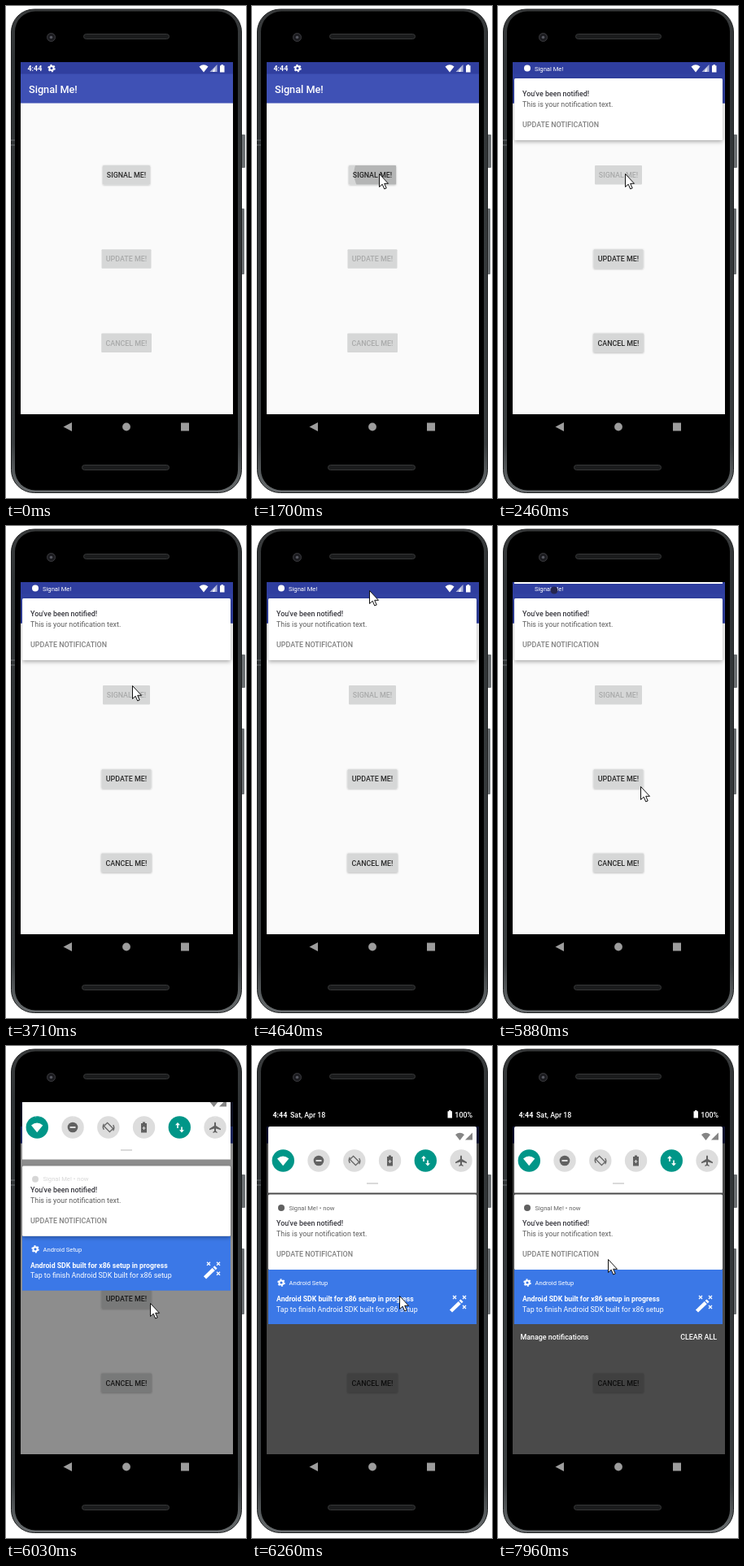
An HTML page that plays this animation: 295x605 px, repeating every 8000 ms.

```html
<!DOCTYPE html>
<html lang="en">
<head>
<meta charset="utf-8">
<title>Notification demo</title>
<style>
html, body { margin: 0; width: 100%; height: 100%; overflow: hidden; background: #fff; }
svg { display: block; width: 295px; height: 605px; }
text { font-family: Roboto, sans-serif; font-size: 8.89px; }
.medium { font-weight: 500; }
.bold { font-weight: 700; }
.small { font-size: 7.62px; }
.middle { text-anchor: middle; }
.end { text-anchor: end; }
.white { fill: #fff; color: #fff; }
.line { fill: none; stroke: currentColor; }
</style>
</head>
<body>
<svg viewBox="0 0 295 605">
  <defs>
    <linearGradient id="rim" x2="0" y2="1">
      <stop offset="0" stop-color="#3a3c3d"/><stop offset=".1" stop-color="#303436"/>
      <stop offset=".9" stop-color="#3a3e40"/><stop offset="1" stop-color="#6a6e70"/>
    </linearGradient>
    <clipPath id="screen"><path d="M18 69H279V502H18Z"/></clipPath>
    <clipPath id="notifyClip"><path d="M119 196H177V219.500H119Z"/></clipPath>
    <filter id="shadow" x="-10%" y="-20%" width="120%" height="150%">
      <feDropShadow dx="0" dy="2" stdDeviation="2.800" flood-opacity=".32"/>
    </filter>
    <filter id="lift" x="-10%" y="-20%" width="120%" height="150%">
      <feDropShadow dx="0" dy=".6" stdDeviation=".8" flood-opacity=".3"/>
    </filter>
    <path id="wifi" d="M0 2.600Q5.500-2 11 2.600L5.500 9.500Z"/>
    <path id="signal" d="M0 9H9V0Z"/>
    <path id="battery" d="M0 1.200H1.500V0H4V1.200H5.500V9.500H0Z"/>
    <g id="gear" class="line">
      <circle r="2.600" stroke-width="2"/><circle r="4" stroke-width="1.500" stroke-dasharray="2.090"/>
    </g>
  </defs>

  <!-- phone -->
  <path fill="#6b6f72" d="M289 158h4q1 0 1 1v39q0 1-1 1h-4zM289 249h3q1 0 1 1v79q0 1-1 1h-4z"/>
  <rect x="6.500" y="4" width="283" height="594.500" rx="28" fill="url(#rim)" stroke="#1b1d1e"/>
  <rect x="11" y="6.500" width="274" height="589" rx="25"/>
  <path stroke="#6a6f72" d="M6 165h5M6 171h5"/>
  <rect x="95.500" y="34.500" width="105" height="6" rx="3" fill="#1b1c1d" stroke="#363738"/>
  <rect x="93.500" y="564.500" width="107" height="6" rx="3" fill="#1b1c1d" stroke="#363738"/>
  <circle cx="55.500" cy="38.500" r="5" fill="#1c1c20" stroke="#3a3a3e"/>
  <circle cx="55.500" cy="38.500" r="1.800" fill="#55565f"/>
  <path fill="#9d9d9d" d="M70.500 517.500L81 512v11zM215 512.500h10v10h-10z"/>
  <circle cx="148" cy="517.500" r="4.900" fill="#9d9d9d"/>

  <g clip-path="url(#screen)">
    <path fill="#fafafa" d="M18 69H279V502H18Z"/>
    <path fill="#3f51b5" d="M18 83H279V119.500H18Z"/>
    <path fill="#303f9f" d="M18 69H279V83.500H18Z"/>
    <text class="white medium" x="28" y="107" style="font-size:12.700px">Signal Me!</text>

    <g id="buttons" class="medium middle"></g>
    <circle id="ripple" cx="156" cy="206" clip-path="url(#notifyClip)"/>

    <path id="barTint" fill="#303f9f" d="M18 69H279V119.500H18Z"/>
    <g id="clock" class="white">
      <text class="bold" x="26.500" y="80">4:44</text>
      <use href="#gear" x="56" y="76.500"/>
    </g>
    <text id="ticker" class="white small" x="45" y="79.500">Signal Me!</text>
    <circle id="tickerIcon" class="white" cx="36" cy="76.500" r="4"/>
    <g id="statusIcons" class="white">
      <use href="#wifi" x="237.500" y="72"/><use href="#signal" x="250.500" y="72" opacity=".6"/>
      <path d="M254 81h2.500v-5.500z"/><use href="#battery" x="263" y="72"/>
    </g>

    <path id="scrim" d="M18 69H279V502H18Z"/>
    <path id="topBlack" d="M18 69H279V99H18Z"/>
    <circle id="dot" cx="69" cy="79" r="4.500" fill="#26264f"/>

    <g id="setup" class="white">
      <path fill="#3b78e7" d="M20 275H276V342H20Z"/>
      <use href="#gear" x="36" y="291"/>
      <text class="small" x="45.500" y="293.700">Android Setup</text>
      <text class="bold" x="30" y="314" style="font-size:8.700px">Android SDK built for x86 setup in progress</text>
      <text x="30" y="326.500">Tap to finish Android SDK built for x86 setup</text>
      <path class="line" stroke-width="4.500" d="M244.500 326L258 313"/>
      <path stroke="#3b78e7" stroke-width="1.200" d="M253.500 313l4 4"/>
      <path class="line" stroke-width="1.300" d="M247 307l4 4m0-4l-4 4M259 307l4 4m0-4l-4 4M259 319l4 4m0-4l-4 4"/>
    </g>

    <g id="notice">
      <rect id="card" x="20" width="256" rx="1.500" fill="#fff" filter="url(#shadow)"/>
      <g id="noticeHead" fill="#616161">
        <circle cx="36" cy="199" r="4"/>
        <text class="small" x="45.500" y="201.700">Signal Me! • now</text>
      </g>
      <g id="noticeBody">
        <text class="medium" x="30" y="111" fill="#35353c">You've been notified!</text>
        <text x="30" y="124" fill="#5c5c5c">This is your notification text.</text>
        <text class="medium" x="30" y="149" fill="#808080">UPDATE NOTIFICATION</text>
      </g>
    </g>

    <g id="quick">
      <path fill="#fff" d="M20 101q0-2 2-2H274q2 0 2 2V180.500H20Z"/>
      <g fill="#858585"><use href="#wifi" x="250" y="106.500"/><use href="#signal" x="262" y="106.500"/></g>
      <path fill="#dadada" d="M141 168h14v2h-14z"/>
      <g id="tiles"></g>
      <g color="#616161" fill="#616161">
        <use class="white" href="#wifi" transform="translate(31 135) scale(1.300)"/>
        <circle cx="82" cy="141" r="6.300"/><path fill="#ddd" d="M78.500 140h7v2h-7z"/>
        <g transform="translate(126 141) rotate(-45)" class="line" stroke-width="1.300">
          <rect x="-3" y="-5" width="6" height="10"/><path d="M-6-2A6.500 6.500 0 0 1-1-7M6 2A6.500 6.500 0 0 1 1 7"/>
        </g>
        <path d="M166 136h2v-1.500h3V136h2v11.500h-7z"/><path stroke="#ddd" d="M167.500 142h4m-2-2v4"/>
        <path class="white" d="M211 135l3 3.300h-2.200V142h-1.600v-3.700H208zM216 147.500l-3-3.300h2.200V140.500h1.600v3.700H219z"/>
        <path transform="translate(257 141)" d="M0-6.500q1 0 1 1.500v3l6 3.700v1.500L1 1.500V4.500l1.600 1.200v1.200L0 6l-2.600.9V5.700L-1 4.500v-3l-6 1.700V1.700L-1-2V-5q0-1.500 1-1.500z"/>
      </g>
    </g>

    <g id="shadeBar" class="white">
      <text class="bold" x="25.500" y="87.500">4:44</text>
      <text class="medium" x="47" y="87.500">Sat, Apr 18</text>
      <use href="#battery" x="240.500" y="79"/>
      <text class="medium end" x="271" y="87.500">100%</text>
    </g>
    <g id="manage" class="white medium">
      <text x="27.500" y="361">Manage notifications</text>
      <text class="end" x="269" y="361">CLEAR ALL</text>
    </g>
  </g>
  <path id="cursor" fill="#fff" stroke="#111" d="M.5.5V16.500L4.200 13.200 6.700 19 9.200 18 6.700 12.300H11.500Z"/>
</svg>

<script>
const LOOP = 8000;
const $ = id => document.getElementById(id);
const clamp = x => Math.max(0, Math.min(1, x));
const progress = (t, a, b) => clamp((t - a) / (b - a));
const easeOut = x => 1 - (1 - x) ** 2;
const smooth = x => x * x * (3 - 2 * x);
const fade = (id, value) => $(id).setAttribute('opacity', value);
const shift = (id, y) => $(id).setAttribute('transform', `translate(0 ${y})`);

const buttons = [['SIGNAL ME!', 119, 58, 196], ['UPDATE ME!', 117.5, 61, 299.2], ['CANCEL ME!', 117.2, 61.8, 402.6]];
$('buttons').innerHTML = buttons.map(([label, x, w, y]) =>
  `<rect x="${x}" y="${y}" width="${w}" height="23.5" rx="1" fill="#d6d7d7"/>
   <text x="148" y="${y + 15}">${label}</text>`).join('');
const faces = [...$('buttons').querySelectorAll('rect')];
const labels = [...$('buttons').querySelectorAll('text')];

$('tiles').innerHTML = [0, 1, 2, 3, 4, 5].map(i =>
  `<circle cx="${38.3 + i * 43.75}" cy="141" r="13.7" fill="${i % 4 ? '#ddd' : '#009688'}"/>`).join('');

// Screen refreshes: first time, last time, count
const refreshes = [[0, 0, 1], [290, 1060, 11], [1140, 1210, 2], [1530, 1530, 1], [1700, 2460, 11],
  [3560, 4330, 11], [4410, 4410, 1], [4640, 4640, 1], [4790, 4790, 1], [4940, 4940, 1],
  [5110, 5880, 11], [5950, 6570, 9], [7500, 7960, 7]];

function lastRefresh(t) {
  const [start, end, count] = refreshes.findLast(r => r[0] <= t);
  if (t >= end) return end;
  const step = (end - start) / (count - 1);
  return start + Math.floor((t - start) / step) * step;
}

// Pointer tip: time, x, y
const pointer = [[290, 249, 526], [1060, 162, 213], [1210, 156, 206], [3483, 156, 206], [4330, 147, 89],
  [4410, 144, 81], [4640, 144, 79], [4790, 144, 76], [4940, 144, 75], [5033, 144, 75], [5260, 144, 63],
  [5880, 175, 320], [6260, 181, 307], [6570, 182, 306], [7423, 182, 306], [7960, 135, 262]];

function pointerAt(t) {
  const i = Math.max(0, pointer.findLastIndex(k => k[0] <= t));
  const a = pointer[i], b = pointer[i + 1] || a;
  const p = a === b ? 0 : smooth(progress(t, a[0], b[0]));
  return [a[1] + (b[1] - a[1]) * p, a[2] + (b[2] - a[2]) * p];
}

function draw(time) {
  const t = lastRefresh(time);
  const [x, y] = pointerAt(t);
  $('cursor').setAttribute('transform', `translate(${Math.round(x)} ${Math.round(y)})`);
  fade('cursor', +(t >= 290));

  const sent = t >= 1770;
  faces.forEach((face, i) => {
    const enabled = sent === (i > 0);
    labels[i].setAttribute('fill', enabled ? '#2a2a2a' : '#a9aaaa');
    face.setAttribute('filter', enabled ? 'url(#lift)' : '');
  });
  $('ripple').setAttribute('r', t < 1530 ? 0 : 12 + (t - 1530) * .11);
  fade('ripple', .16 * (1 - progress(t, 1700, 2000)));

  const popup = easeOut(progress(t, 1800, 2300));
  const pull = easeOut(progress(t, 5880, 6260));
  const leaving = progress(t, 5500, 5880);

  fade('clock', 1 - progress(t, 1770, 1930));
  fade('ticker', popup * (1 - clamp(pull * 3)));
  fade('tickerIcon', popup * (1 - leaving));
  fade('statusIcons', 1 - leaving);
  fade('barTint', popup * .85);
  fade('dot', +(t >= 5800 && pull < .1));

  fade('notice', popup);
  shift('notice', 18 * (popup - 1));
  $('card').setAttribute('y', 89 + 93.5 * pull);
  $('card').setAttribute('height', 76 + 16.5 * pull);
  $('card').setAttribute('filter', pull < 1 ? 'url(#shadow)' : '');
  shift('noticeBody', 110 * pull);
  shift('noticeHead', 94 * (pull - 1));
  fade('noticeHead', clamp(pull * 2 - 1));

  fade('scrim', .7 * pull);
  fade('topBlack', pull);
  fade('shadeBar', clamp(pull * 2 - 1));
  fade('setup', clamp(pull * 2));
  shift('setup', 110 * (pull - 1));
  // The panel's lower edge peeks in by two pixels before it opens
  shift('quick', 109.5 * (pull - 1));
  fade('quick', +(t >= 5800));
  fade('manage', progress(t, 6260, 6570));
}

function tick() {
  draw(performance.now() % LOOP);
  requestAnimationFrame(tick);
}
tick();
</script>
</body>
</html>
```
